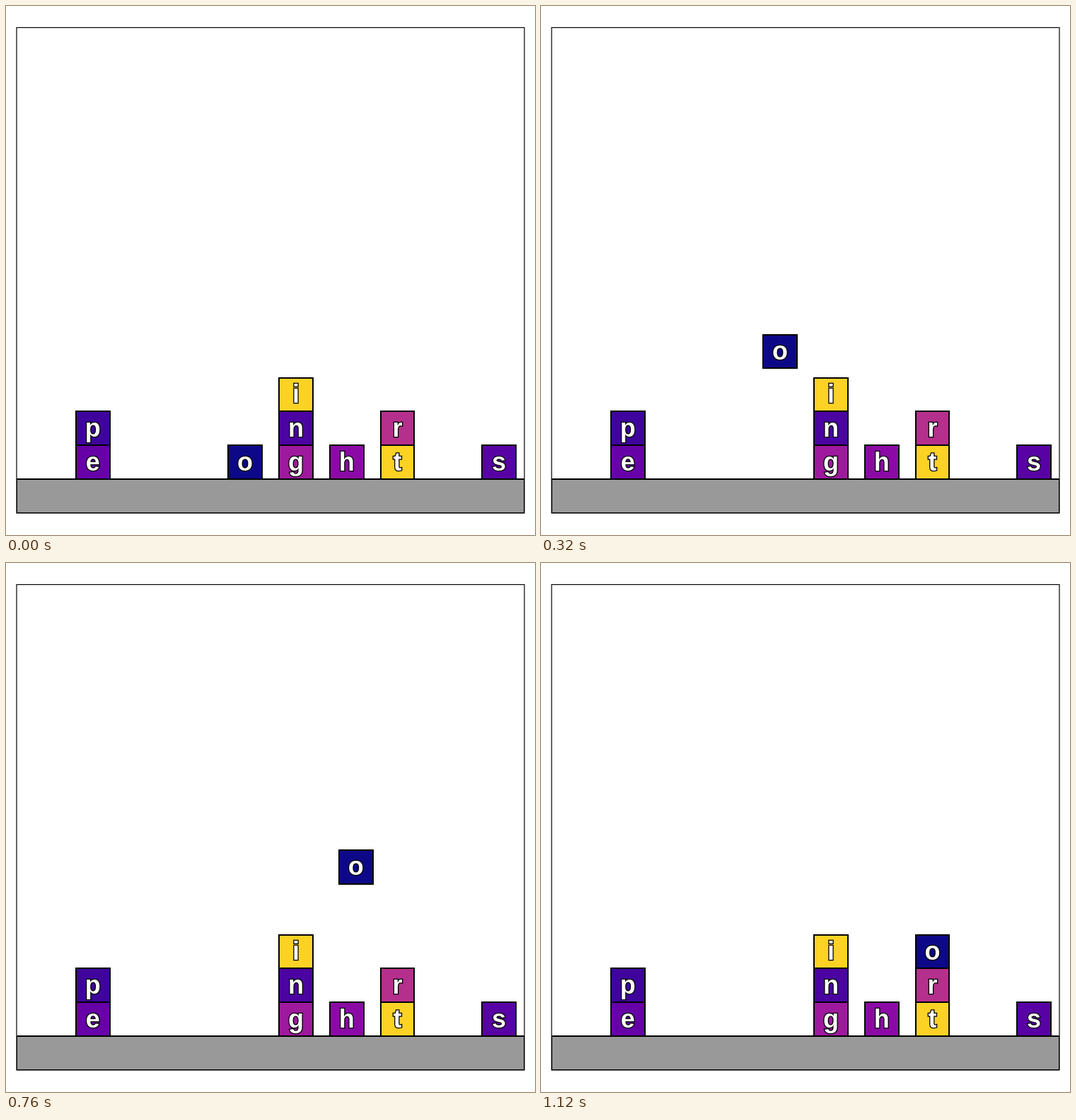
An HTML page with a canvas for the animation above (1160 ms loop, 748 px wide and 748 px high).

```html
<!DOCTYPE html>
<html lang="en">
<head>
<meta charset="utf-8">
<title>Letter blocks</title>
<style>
  html, body { margin: 0; width: 100%; height: 100%; overflow: hidden; background: #fff; }
  canvas { display: block; width: 748px; height: 748px; }
</style>
</head>
<body>
<canvas id="stage" width="748" height="748"></canvas>
<script>
const ctx = document.getElementById('stage').getContext('2d');

const LEFT = 15, RIGHT = 733, TOP = 30.5, BOTTOM = 717;
const UNIT = (RIGHT - LEFT) / 15;
const STEP = 40, STEPS = 29;
const LIFT = 11, SHIFT = 11, DROP = 6;

// letter, colour, left edge and bottom edge in units
const blocks = [
  ['e', '#6600a7', 1.75, 1],
  ['p', '#3e049c', 1.75, 2],
  ['g', '#9e199d', 7.75, 1],
  ['n', '#4b03a1', 7.75, 2],
  ['i', '#fcd225', 7.75, 3],
  ['h', '#8b0aa5', 9.25, 1],
  ['t', '#fcd225', 10.75, 1],
  ['r', '#b52f8c', 10.75, 2],
  ['s', '#5801a4', 13.75, 1]
];

const px = x => LEFT + x * UNIT;
const py = y => BOTTOM - y * UNIT;
const part = (n, start, length) => Math.min(1, Math.max(0, (n - start) / length));

function box(x, y, w, h, color) {
  const l = Math.round(px(x)), r = Math.round(px(x + w));
  const t = Math.round(py(y + h)), b = Math.round(py(y));
  ctx.fillStyle = color;
  ctx.fillRect(l, t, r - l, b - t);
  ctx.lineWidth = 2;
  ctx.strokeRect(l, t, r - l, b - t);
}

function block([letter, color, x, y]) {
  box(x, y, 1, 1, color);
  const cx = px(x + 0.5), base = py(y + 0.5) + 11.5;
  ctx.lineWidth = 2.6;
  ctx.strokeText(letter, cx, base);
  ctx.fillStyle = '#fff';
  ctx.fillText(letter, cx, base);
}

function draw(n) {
  ctx.fillStyle = '#fff';
  ctx.fillRect(0, 0, 748, 748);
  ctx.strokeStyle = '#000';
  ctx.lineJoin = 'miter';

  ctx.save();
  ctx.beginPath();
  ctx.rect(LEFT, TOP, RIGHT - LEFT, BOTTOM - TOP);
  ctx.clip();
  box(0, 0, 15, 1, '#999');
  ctx.restore();

  ctx.font = 'bold 36px "Liberation Sans", Arial, sans-serif';
  ctx.textAlign = 'center';
  ctx.textBaseline = 'alphabetic';
  blocks.forEach(block);

  const x = 6.25 + 4.5 * part(n, LIFT, SHIFT);
  const y = 1 + 4.5 * part(n, 0, LIFT) - 2.5 * part(n, LIFT + SHIFT, DROP);
  block(['o', '#0d0887', x, y]);

  ctx.lineWidth = 1.2;
  ctx.strokeRect(LEFT, TOP, RIGHT - LEFT, BOTTOM - TOP);
}

function tick() {
  draw(Math.floor(performance.now() / STEP) % STEPS);
  requestAnimationFrame(tick);
}
tick();
</script>
</body>
</html>
```
